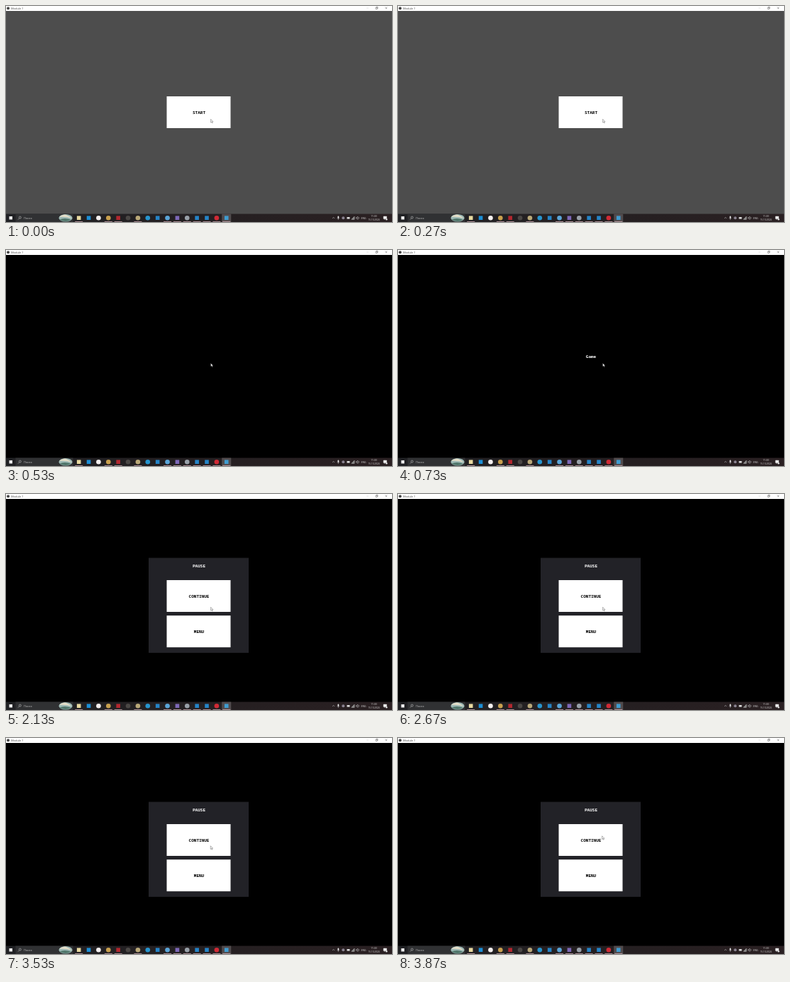
Write an HTML page that moves like this. It is 544 by 306 pixels and loops after 3.94 s.

```html
<!DOCTYPE html>
<html lang="en">
<head>
<meta charset="utf-8">
<title>Menu screens</title>
<style>
  html, body { margin: 0; width: 100%; height: 100%; overflow: hidden; background: #000; }
  svg { display: block; width: 100vw; height: 100vh; }
  .ui { font: 4px "Open Sans", sans-serif; }
  .label { font: bold 6px "Noto Sans Mono", monospace; text-anchor: middle; }
  .mid { text-anchor: middle; }
  .line { fill: none; stroke-width: .5; }
</style>
</head>
<body>
<svg viewBox="0 0 544 306">
  <rect id="back" width="544" height="306"/>

  <g id="start">
    <rect x="226.5" y="128" width="90" height="45" fill="#fff"/>
    <text class="label" x="272" y="152.8">START</text>
  </g>
  <g id="game">
    <text class="label" x="272" y="152.8" fill="#fff">Game</text>
  </g>
  <g id="pause">
    <rect x="201" y="90.5" width="141" height="134.5" fill="#222227"/>
    <text class="label" x="272" y="104" fill="#fff">PAUSE</text>
    <rect x="226.5" y="122" width="90" height="45" fill="#fff"/>
    <text class="label" x="272" y="147">CONTINUE</text>
    <rect x="226.5" y="172.2" width="90" height="45" fill="#fff"/>
    <text class="label" x="272" y="197">MENU</text>
  </g>

  <!-- title bar -->
  <rect width="544" height="7" fill="#fff"/>
  <circle cx="3" cy="3.2" r="2" fill="#444"/>
  <text class="ui" x="7" y="4.7" fill="#444">Module 1</text>
  <g class="line" stroke="#555">
    <path d="M508 3h3" stroke="#ccc"/>
    <path d="M521 2.2h2.2v2.2h-2.2zM521.8 2.2v-.8h2.2v2.2h-.8"/>
    <path d="M534.6 1.6l2.4 2.4m0-2.4l-2.4 2.4"/>
  </g>

  <!-- taskbar -->
  <defs>
    <linearGradient id="bar">
      <stop offset="0" stop-color="#202124"/>
      <stop offset=".5" stop-color="#241f21"/>
      <stop offset="1" stop-color="#2a2022"/>
    </linearGradient>
  </defs>
  <rect y="294.5" width="544" height="11.5" fill="url(#bar)"/>
  <rect x="13.5" y="294.5" width="81" height="11.5" fill="#303133"/>
  <rect x="4.5" y="298" width="4.5" height="4.5" fill="#eee"/>
  <g class="line" stroke="#ddd">
    <circle cx="19.8" cy="299.6" r="1.5"/>
    <path d="M18.7 300.8l-1.7 1.8"/>
  </g>
  <text class="ui" x="25" y="301.8" fill="#bbb">Поиск</text>
  <ellipse cx="84" cy="300.3" rx="9.5" ry="5.2" fill="#9db9b5"/>
  <path d="M75 299q5-5 10-3t8 5q-9-3-18-2" fill="#e3ddc8"/>
  <path d="M75.5 302.5q7-3 16 0-7 5-16 0" fill="#50766b"/>
  <g id="apps"></g>

  <!-- tray -->
  <g class="line" stroke="#ddd">
    <path d="M460 301l1.6-1.6 1.6 1.6"/>
    <path d="M466.8 300.3q1.5 3 3 0M468.3 302v1"/>
    <path d="M487 302.3l4-4v4z" fill="#777"/>
    <path d="M493.5 299.5h1l1.3-1.3v4.2l-1.3-1.3h-1zM497 299q1 1.3 0 2.6"/>
    <path d="M532 298h4.5v3.6h-2l-1 1v-1H532z" fill="#eee"/>
  </g>
  <rect x="467.5" y="297.6" width="1.7" height="3.4" rx=".8" fill="#eee"/>
  <circle cx="475.3" cy="300.3" r="2" fill="#8a8290"/>
  <rect x="480.5" y="299" width="4" height="2.6" fill="#ddd"/>
  <circle cx="536.3" cy="302.2" r="1.3" fill="#ddd"/>
  <g class="ui mid" fill="#ddd">
    <text x="504" y="301.8" style="font-size:3.4px">ENG</text>
    <text x="518.5" y="299.2" style="font-size:3.4px">11:03</text>
    <text x="518.5" y="304.2" style="font-size:3.2px">15.10.2024</text>
  </g>

  <path id="cursor" d="M0 0V4.7L1.1 3.7 1.9 5.4 2.7 5 1.9 3.4H3.3Z"
        fill="#fff" stroke="#222" stroke-width=".35"/>
</svg>
<script>
const $ = id => document.getElementById(id);
const LOOP = 3940, TICK = 1000 / 15;

// Colour, shape (c = circle, s = square), then u if the app is running
const apps = [
  '#e8d9a0 s u', '#1c8fd6 s', '#f4f0f0 c', '#c9a04e c u', '#b3272f s u', '#4a4745 c',
  '#b9a878 c u', '#2795cf c', '#2584c7 s', '#5aa5d8 c u', '#7d68b8 s u', '#98a0a8 c u',
  '#2584c7 s u', '#2584c7 s u', '#d02a35 c u', '#3f9cd0 s u'
];
$('apps').innerHTML = apps.map((spec, i) => {
  const [color, shape, running] = spec.split(' ');
  const x = 102.7 + i * 13.87;
  const active = i === apps.length - 1
    ? `<rect x="${x - 6.5}" y="294.5" width="13" height="11.5" fill="#514b4d"/>` : '';
  const icon = shape === 'c'
    ? `<circle cx="${x}" cy="300.2" r="3.3" fill="${color}"/>`
    : `<rect x="${x - 2.8}" y="297.4" width="5.6" height="5.6" fill="${color}"/>`;
  const bar = running
    ? `<rect x="${x - 5.5}" y="305.2" width="11" height=".8" fill="#c9a5ad"/>` : '';
  return active + icon + bar;
}).join('');

const show = (id, on) => $(id).setAttribute('visibility', on ? 'visible' : 'hidden');

function draw(t) {
  const step = Math.floor((t + 4) / TICK);
  show('start', step < 8);
  show('game', step >= 9 && step < 32);
  show('pause', step >= 32);
  $('back').setAttribute('fill', step < 8 ? '#4d4d4d' : '#000');

  const p = Math.min(1, Math.max(0, (step - 51) / 5));
  const ease = p * p * (3 - 2 * p);
  $('cursor').setAttribute('transform', `translate(${288.6 - ease} ${160.4 - 21.6 * ease})`);
}

function frame() {
  draw(performance.now() % LOOP);
  requestAnimationFrame(frame);
}
frame();
</script>
</body>
</html>
```
